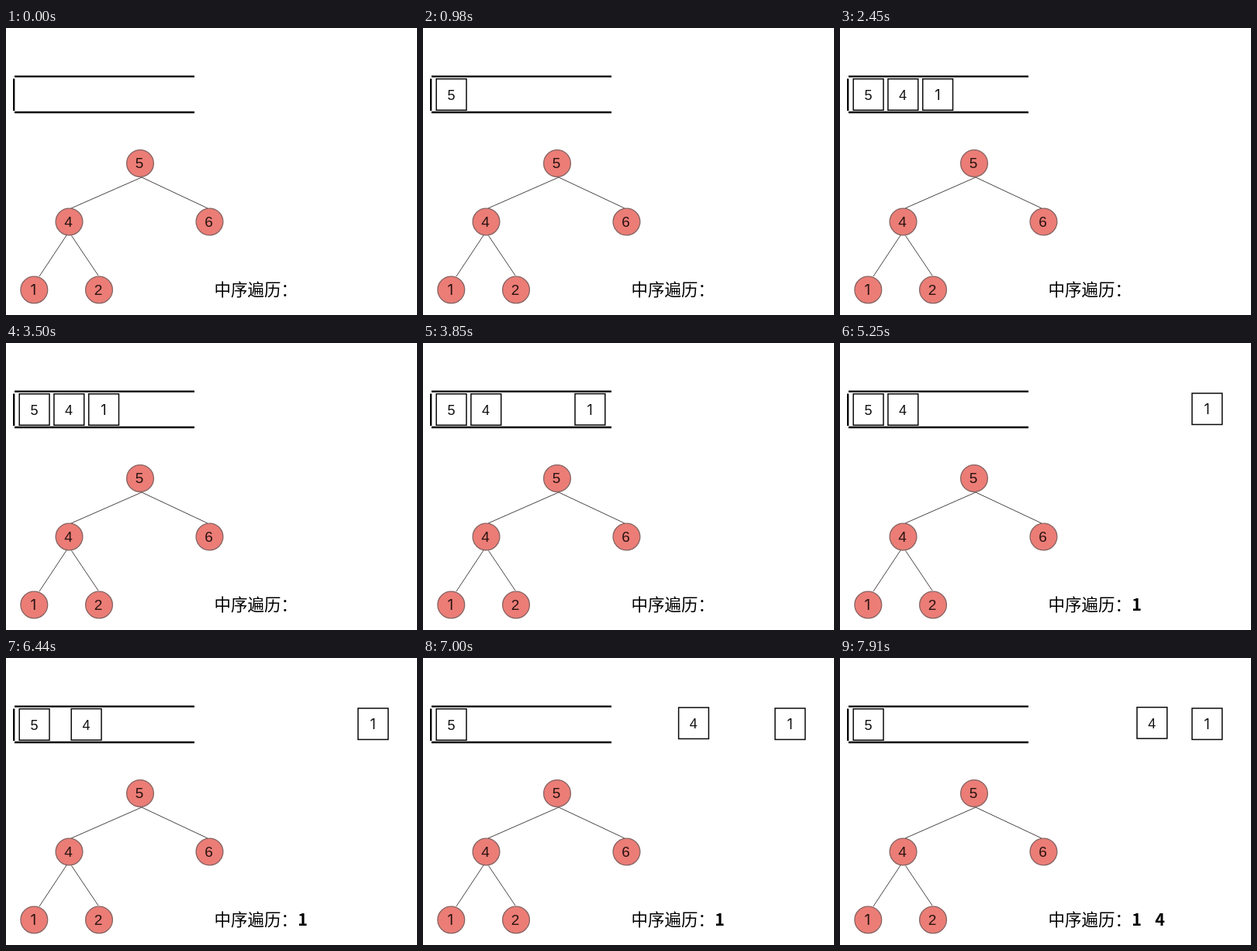
An HTML page for the animation above (8000 ms loop, 530 by 371 pixels).

```html
<!DOCTYPE html>
<html lang="zh-CN">
<head>
<meta charset="utf-8">
<title>Tree traversal</title>
<style>
  html, body { margin: 0; width: 100%; height: 100%; overflow: hidden; background: #fff; }
  svg { display: block; width: 530px; height: 371px; }
  .queue { stroke: #000; stroke-width: 2.3; fill: none; }
  .edge { stroke: #4a4343; stroke-width: 1; }
  .node circle { fill: #eb7d76; stroke: #876463; stroke-width: 1.3; }
  .node text { font-size: 19px; fill: #2a1312; }
  .card rect { fill: #fff; stroke: #0a0a0a; stroke-width: 1.5; }
  .card text { font-size: 18px; fill: #111; }
  .num { font-family: "Liberation Sans", Arial, sans-serif; text-anchor: middle; }
  .one { font-family: Inter, sans-serif; }
  .label, .out { font: 500 21.5px "Noto Sans CJK SC", "Noto Sans CJK", sans-serif; fill: #000; }
  .out { font-weight: 700; text-anchor: middle; }
</style>
</head>
<body>
<svg id="stage" viewBox="0 0 530 371">
  <path class="queue" d="M11 62.6H243M11 109H243M10.2 65.5V107"/>
  <text class="label" x="268.5" y="346.3">中序遍历：</text>
</svg>
<script>
const LOOP = 8000, STEP = 70;
const stage = document.getElementById('stage');

function add(parent, tag, attrs, text) {
  const el = document.createElementNS('http://www.w3.org/2000/svg', tag);
  for (const key in attrs) el.setAttribute(key, attrs[key]);
  if (text) el.textContent = text;
  return parent.appendChild(el);
}

const digit = (parent, value, x, y) =>
  add(parent, 'text', { class: value === '1' ? 'num one' : 'num', x, y }, value);

const edges = [[175, 193, 84, 233], [175, 193, 260, 233], [78, 268, 43, 321], [84.5, 268.5, 119, 320]];
for (const [x1, y1, x2, y2] of edges) add(stage, 'line', { class: 'edge', x1, y1, x2, y2 });

const nodes = [['5', 173, 175], ['4', 81.5, 250.5], ['6', 262.5, 250.5], ['1', 36.3, 338.5], ['2', 120, 338.5]];
for (const [value, cx, cy] of nodes) {
  const g = add(stage, 'g', { class: 'node' });
  add(g, 'circle', { cx, cy, r: 17.4 });
  digit(g, value, cx - 1, cy + 6.2);
}

// show: time the card enters the queue; move: start, duration, target
const cards = [
  { value: '5', x: 17.2, show: 350 },
  { value: '4', x: 61.9, show: 1400, move: [6271, 995, 383, 63.7] },
  { value: '1', x: 106.7, show: 2450, move: [3508, 1010, 454, 65] }
];
const TOP = 65.8;
for (const card of cards) {
  card.el = add(stage, 'g', { class: 'card' });
  add(card.el, 'rect', { width: 38.8, height: 40.4 });
  digit(card.el, card.value, 19.2, 27.4);
}

const outputs = [['1', 382.7, 5110], ['4', 412.5, 7630]].map(([value, x, show]) =>
  ({ show, el: add(stage, 'text', { class: 'out', x, y: 346.3 }, value) }));

const ease = p => (1 - Math.cos(Math.PI * Math.min(1, Math.max(0, p)))) / 2;
const toggle = (el, on) => el.setAttribute('visibility', on ? 'visible' : 'hidden');

function draw(now) {
  const t = Math.floor((now % LOOP) / STEP) * STEP;
  for (const { el, x, show, move } of cards) {
    let left = x, top = TOP;
    if (move) {
      const [start, duration, toX, toY] = move;
      const k = ease((t - start) / duration);
      left += (toX - x) * k;
      top += (toY - TOP) * k;
    }
    toggle(el, t >= show);
    el.setAttribute('transform', `translate(${left} ${top})`);
  }
  for (const { el, show } of outputs) toggle(el, t >= show);
}

const begin = performance.now();
function tick() {
  draw(performance.now() - begin);
  requestAnimationFrame(tick);
}
tick();
</script>
</body>
</html>
```
